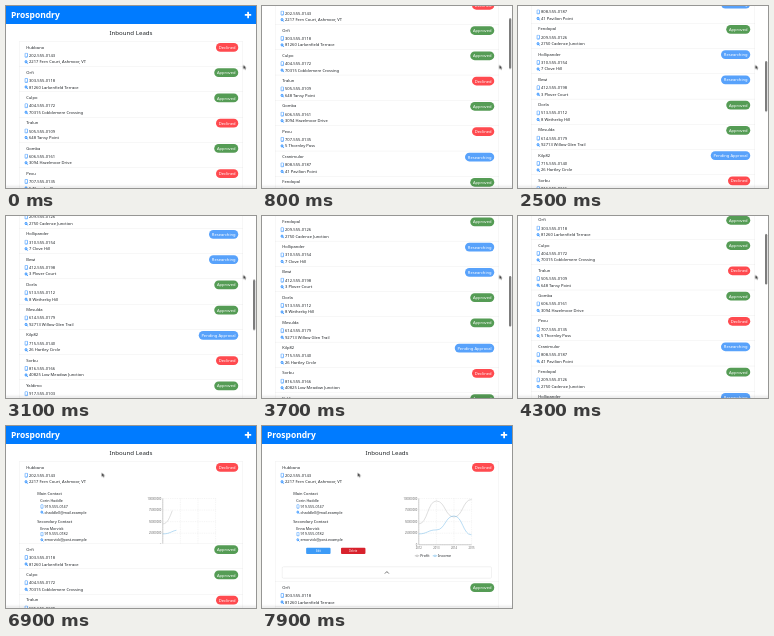
An HTML page that plays this animation: 250x182 px, repeating every 8 s.

```html
<!DOCTYPE html>
<html lang="en">
<head>
<meta charset="utf-8">
<title>Inbound Leads</title>
<style>
@property --scroll { syntax: "<number>"; inherits: true; initial-value: 0; }

html, body { margin: 0; width: 100%; height: 100%; overflow: hidden; background: #fff; }

/* Laid out at four times the stage size, then scaled down. */
#stage {
  position: absolute; left: 0; top: 0; width: 1000px; height: 728px; overflow: hidden;
  transform: scale(.25); transform-origin: 0 0;
  font: 16.4px/24px "Noto Sans", "Open Sans", sans-serif; color: #212529; background: #fff;
  animation: scroll 8s linear infinite;
}
#stage::after {
  content: ""; position: absolute; left: 0; bottom: 0; width: 100%; height: 14px;
  background: linear-gradient(transparent, rgba(0, 0, 0, .1));
}
#page { position: absolute; inset: 0; transform: translateY(calc(var(--scroll) * -4px)); }
header { position: absolute; width: 1000px; height: 72px; background: #007bff; color: #fff; }
header b { position: absolute; left: 20px; top: 0; font-size: 34px; line-height: 70px; }
header i { position: absolute; background: #fff; border-radius: 2px; }
header i:nth-of-type(1) { left: 955px; top: 32px; width: 26px; height: 7px; }
header i:nth-of-type(2) { left: 964.5px; top: 22.5px; width: 7px; height: 26px; }
h1 { position: absolute; top: 87px; width: 1000px; margin: 0; text-align: center; font-size: 24.5px; line-height: 36px; font-weight: 400; }

#list { position: absolute; left: 52px; top: 141px; width: 896px; border-top: 1.5px solid #dcdcdc; }
.card { position: relative; border: solid #dcdcdc; border-width: 0 1.5px 1.5px; box-sizing: border-box; }
.summary { position: relative; height: 100.1px; }
.summary > * { position: absolute; white-space: nowrap; }
.summary > span { font-weight: 500; }
.name { left: 28px; top: 10px; }
.phone, .place { left: 39px; }
.phone { top: 43px; }
.place { top: 69px; }
.summary svg { left: 20px; width: 16px; height: 20px; }
.pill { right: 18px; top: 6px; padding: 0 11px; border-radius: 18px; line-height: 35px; color: #fff; }
.Declined { background: #ff4a4f; }
.Approved { background: #559c55; }
.Researching, .Pending { background: #58a2fb; }

#detail { overflow: hidden; height: 0; animation: expand 8s infinite; }
#detail svg { display: block; width: 893px; height: 380px; }
#detail text { font-size: 4px; fill: #212529; }
#detail .small { font-size: 3.7px; }
#detail .tick { font-size: 2.7px; fill: #666; }
#detail .button { font-size: 2.7px; fill: #fff; text-anchor: middle; }
.curve { fill: none; stroke-width: .45; stroke-dasharray: 1; animation: trace 8s infinite; }

#thumb {
  position: absolute; left: 988px; top: 2px; width: 9px; height: 202px; border-radius: 5px;
  background: #7d7d7d; transform: translateY(calc(var(--scroll) * 1.12px));
  animation: thumb 8s linear infinite;
}
#pointer { position: absolute; left: 0; top: 0; width: 13px; height: 19px; overflow: visible; animation: point 8s infinite; }

@keyframes scroll {
  0%, 4% { --scroll: 0; }
  5% { --scroll: 6; }
  8.75% { --scroll: 32; }
  12.5% { --scroll: 62; }
  17.5% { --scroll: 99.3; }
  22.5% { --scroll: 138; }
  27.5% { --scroll: 172; }
  31.25% { --scroll: 195; }
  37.5% { --scroll: 223; }
  42.5%, 44.4% { --scroll: 232; }
  46.25% { --scroll: 212.8; }
  50% { --scroll: 134; }
  53.75% { --scroll: 62.5; }
  57.5% { --scroll: 22; }
  62% { --scroll: 5; }
  66.25%, 100% { --scroll: 0; }
}
@keyframes thumb {
  0%, 4% { opacity: 0; }
  5%, 66.5% { opacity: 1; }
  69.5%, 100% { opacity: 0; }
}
@keyframes point {
  0%, 64.5% { transform: translate(949px, 236px); animation-timing-function: ease-in; }
  70% { transform: translate(565px, 175px); animation-timing-function: ease-out; }
  76.25%, 100% { transform: translate(383px, 187px); }
}
@keyframes expand {
  0%, 82.8% { height: 0; animation-timing-function: ease-in-out; }
  89%, 100% { height: 380px; }
}
@keyframes trace {
  0%, 84% { stroke-dashoffset: 1; animation-timing-function: ease; }
  98%, 100% { stroke-dashoffset: 0; }
}
</style>
</head>
<body>
<svg width="0" height="0" style="position:absolute">
  <symbol id="mobile" viewBox="0 0 16 20">
    <rect x="3" y="1.5" width="10" height="17" rx="2" fill="#fff" stroke="#1683ff" stroke-width="2.2"/>
    <path d="M6 15.5h4" stroke="#1683ff" stroke-width="2"/>
  </symbol>
  <symbol id="lens" viewBox="0 0 16 20">
    <circle cx="7" cy="9" r="4.6" fill="#a9d2ff" stroke="#1683ff" stroke-width="2.6"/>
    <path d="M10.5 12.5l4 4" stroke="#1683ff" stroke-width="3" stroke-linecap="round"/>
  </symbol>
</svg>
<div id="stage">
  <div id="page">
    <header><b>Prospondry</b><i></i><i></i></header>
    <h1>Inbound Leads</h1>
    <div id="list"></div>
  </div>
  <div id="thumb"></div>
  <svg id="pointer" viewBox="0 0 13 19"><path d="M0 0V16L4 12.5L7 19L10 17.5L7.2 11.5H12.5Z" fill="#111" stroke="#fff"/></svg>
</div>
<script>
const leads = [
  ["Hubbano", "202-555-0143", "2217 Fern Court, Ashmoor, VT", "Declined"],
  ["Orfi", "303-555-0118", "81260 Larkenfield Terrace", "Approved"],
  ["Culpo", "404-555-0172", "70315 Cobblemere Crossing", "Approved"],
  ["Tralun", "505-555-0109", "648 Tansy Point", "Declined"],
  ["Gomba", "606-555-0161", "3094 Hazelmoor Drive", "Approved"],
  ["Pexu", "707-555-0135", "5 Thornley Pass", "Declined"],
  ["Cranimulor", "808-555-0187", "41 Pavilion Point", "Researching"],
  ["Fendopal", "209-555-0126", "2750 Cadence Junction", "Approved"],
  ["Hollipander", "310-555-0154", "7 Clove Hill", "Researching"],
  ["Bewi", "412-555-0198", "3 Plover Court", "Researching"],
  ["Dorla", "513-555-0112", "8 Wetherby Hill", "Approved"],
  ["Mesulda", "614-555-0179", "92713 Willow Glen Trail", "Approved"],
  ["Kilp82", "715-555-0140", "26 Hartley Circle", "Pending Approval"],
  ["Sorbu", "816-555-0166", "40825 Low Meadow Junction", "Declined"],
  ["Yaldimo", "917-555-0103", "614 Copper Lane", "Approved"],
  ["Nebrit", "218-555-0131", "19 Orchard Way", "Researching"]
];

const text = (x, y, s, cls = "", extra = "") => `<text x="${x}" y="${y}" class="${cls}" ${extra}>${s}</text>`;
const icon = (id, x, y) => `<use href="#${id}" x="${x}" y="${y}" width="3.6" height="4.5"/>`;
const range = n => [...Array(n).keys()];

const contact = (y, title, name, phone, mail) =>
  text(31, y, title) + text(34, y + 7, name, "small") +
  icon("mobile", 34, y + 9.3) + text(38.3, y + 12.8, phone, "small") +
  icon("lens", 34, y + 15.1) + text(38.3, y + 18.6, mail, "small");

const button = (x, label, fill) =>
  `<rect x="${x}" y="121.8" width="24.5" height="6.4" rx="1" fill="${fill}"/>` + text(x + 12.2, 126, label, "button");

// Smooth curve with level tangents at each evenly spaced year.
const curve = (ys, color) => {
  const step = 53 / (ys.length - 1);
  const d = ys.map((y, i) => {
    const x = 157 + i * step;
    return i ? `C${x - step / 2} ${ys[i - 1]} ${x - step / 2} ${y} ${x} ${y}` : `M${x} ${y}`;
  }).join("");
  return `<path class="curve" pathLength="1" d="${d}" stroke="${color}"/>`;
};

const legend = (x, label, color) =>
  `<path d="M${x} 130h4.6" stroke="${color}" stroke-width=".5"/>
   <circle cx="${x + 2.3}" cy="130" r=".9" fill="#fff" stroke="${color}" stroke-width=".45"/>` +
  text(x + 5.4, 131.3, label, "small");

const chart = () => {
  const rows = range(5).map(i => 72.5 + i * 11.6);
  const cols = range(4).map(i => 157 + i * 53 / 3);
  const grid = rows.map(y => `M157 ${y}H210`).join("") + cols.map(x => `M${x} 72.5V118.9`).join("");
  const marks = ["100000000", "75000000", "50000000", "25000000", "0"];
  return `<path d="${grid}" stroke="#ccc" stroke-width=".25" stroke-dasharray=".9 .9"/>
    <path d="M157 72.5V118.9H210" fill="none" stroke="#777" stroke-width=".35"/>` +
    rows.map((y, i) => text(155.5, y + 1, marks[i], "tick", 'text-anchor="end"')).join("") +
    cols.map((x, i) => text(x, 123.2, 2012 + i, "tick", 'text-anchor="middle"')).join("") +
    curve([98, 75, 91, 73.5], "#b4b4b4") + curve([108, 104, 90, 109], "#63b3e6") +
    legend(153, "Profit", "#999") + legend(171, "Income", "#63b3e6");
};

const detail = () => `<div id="detail"><svg viewBox="13 60.6 224 95">` +
  contact(69, "Main Contact", "Corin Haddle", "919-555-0147", "chaddle0@mail.example") +
  contact(96.7, "Secondary Contact", "Enna Morvick", "919-555-0182", "emorvick@post.example") +
  button(44, "Edit", "#3d9bf7") + button(79, "Delete", "#d8222d") + chart() +
  `<rect x="20" y="141" width="210" height="11.5" rx="1.2" fill="#fff" stroke="#d8d8d8" stroke-width=".35"/>
   <path d="M123 147.8l2-2 2 2" fill="none" stroke="#222" stroke-width=".65"/></svg></div>`;

const card = ([name, phone, place, status], i) => `<div class="card"><div class="summary">
  <span class="name">${name}</span><span class="pill ${status}">${status}</span>
  <svg style="top:45px"><use href="#mobile"/></svg><span class="phone">${phone}</span>
  <svg style="top:72px"><use href="#lens"/></svg><span class="place">${place}</span>
  </div>${i ? "" : detail()}</div>`;

document.getElementById("list").innerHTML = leads.map(card).join("");
</script>
</body>
</html>
```
